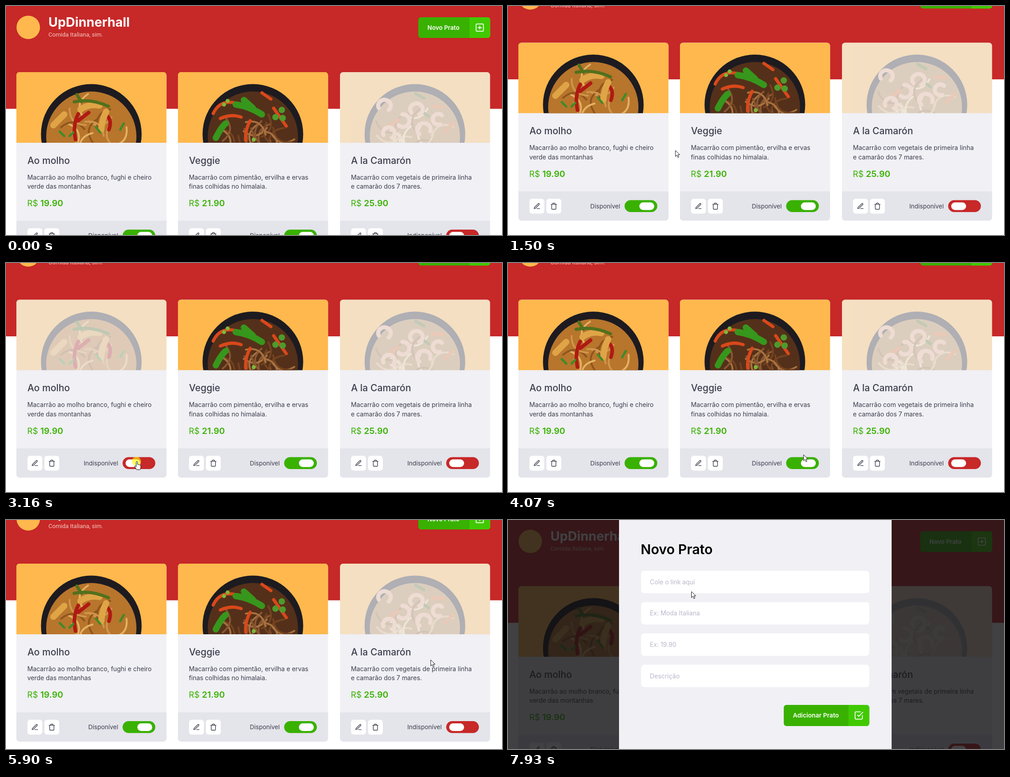
Recreate the animation shown at these times as an HTML page. Size 1099 px wide and 509 px high, loop 8000 ms.

```html
<!DOCTYPE html>
<html lang="pt">
<head>
<meta charset="utf-8">
<title>Pratos</title>
<style>
html, body { margin: 0; width: 100%; height: 100%; overflow: hidden; background: #fff; }
svg { display: block; width: 1099px; height: 509px; }
text { font-family: Inter, sans-serif; white-space: pre; }
.icon { fill: none; stroke-width: 2; stroke-linecap: round; stroke-linejoin: round; }
.strip { fill: none; stroke-linecap: round; }
</style>
</head>
<body>
<svg id="stage" viewBox="0 0 1099 509"></svg>
<script>
const LOOP = 8000, SCROLL = 65.5;
const RED = [199, 40, 40], GREEN = [57, 177, 0];
const INK = '#3d3d4d';

const ICONS = {
  edit: 'M12 20h9M16.5 3.5a2.12 2.12 0 0 1 3 3L7 19l-4 1 1-4Z',
  trash: 'M3 6h18M19 6v14a2 2 0 0 1-2 2H7a2 2 0 0 1-2-2V6m3 0V4a2 2 0 0 1 2-2h4a2 2 0 0 1 2 2v2',
  plus: 'M5 3h14a2 2 0 0 1 2 2v14a2 2 0 0 1-2 2H5a2 2 0 0 1-2-2V5a2 2 0 0 1 2-2ZM12 8v8M8 12h8',
  check: 'M9 11l3 3L22 4M21 12v7a2 2 0 0 1-2 2H5a2 2 0 0 1-2-2V5a2 2 0 0 1 2-2h11'
};

// Each piece: colour, width, path
const CARDS = [
  { x: 23, title: 'Ao molho', price: '19.90',
    lines: ['Macarrão ao molho branco, fughi e cheiro', 'verde das montanhas'],
    base: '#b8752c', noodles: ['#e2b263', '#d0954a', '#8f551d'],
    pieces: [
      ['#b01a12', 8, 'M137 93Q124 118 131 150M160 90L137 108M205 128Q212 108 202 98'],
      ['#dfa446', 14, 'M142 83Q160 70 184 74M188 128Q190 104 199 88M82 118L106 94'],
      ['#52701c', 7, 'M128 66Q165 58 204 76M134 50L144 66'],
      ['#3f8a28', 5, 'M176 122l10 12M230 128l8-14M96 132l10 10M118 142l8-8']
    ] },
  { x: 381, title: 'Veggie', price: '21.90',
    lines: ['Macarrão com pimentão, ervilha e ervas', 'finas colhidas no himalaia.'],
    base: '#54301a', noodles: ['#a87240', '#8a5730', '#73421f'],
    pieces: [
      ['#d9481a', 7, 'M78 92Q92 62 124 68M94 103Q118 92 140 100M150 152Q148 130 160 108M212 80l28 40M186 46l20 14'],
      ['#37961c', 14, 'M128 72Q158 76 186 94M146 62L166 80M84 146Q96 122 106 114'],
      ['#4f9a2c', 14, 'M216 100h.1M230 84h.1M232 102h.1'],
      ['#7eb63a', 9, 'M110 64h.1M168 150h.1M102 72h.1']
    ] },
  { x: 740, title: 'A la Camarón', price: '25.90',
    lines: ['Macarrão com vegetais de primeira linha', 'e camarão dos 7 mares.'],
    base: '#b08040', noodles: ['#ead09a', '#d8b070', '#94602c'],
    pieces: [
      ['#d9702c', 8, 'M206 76l24 2M232 132l18-18M112 118l16-12'],
      ['#62762a', 7, 'M168 48l18 10M196 98l-14-10'],
      ['#eab089', 9, 'M86 80a14 13 0 1 1 22 4M130 118a14 14 0 1 0 8-24M158 90a14 13 0 1 1 18 4M176 138a15 14 0 1 1 24-6M96 140a13 13 0 1 1 20 6M222 116a12 12 0 1 1 4-20']
    ] }
];

const text = (x, y, s, size, weight, fill, more = '') =>
  `<text x="${x}" y="${y}" font-size="${size}" font-weight="${weight}" fill="${fill}" ${more}>${s}</text>`;
const box = (x, y, w, h, r, fill, more = '') =>
  `<rect x="${x}" y="${y}" width="${w}" height="${h}" rx="${r}" fill="${fill}" ${more}/>`;
const icon = (name, cx, cy, k, stroke) =>
  `<path class="icon" stroke="${stroke}" d="${ICONS[name]}" transform="translate(${cx - 12 * k} ${cy - 12 * k}) scale(${k})"/>`;

// Green button with a lighter icon cell on the right
const button = (x, y, w, h, label, size, name) =>
  box(x, y, w, h, 6, '#39b100') +
  `<path fill="#41c900" d="M${x + w - 46} ${y}h40a6 6 0 0 1 6 6v${h - 12}a6 6 0 0 1-6 6h-40Z"/>` +
  text(x + 20.3, y + h / 2 + 4.8, label, size, 600, '#fff') +
  icon(name, x + w - 23.3, y + h / 2, .9, '#fff');

function random(seed) {
  return () => (seed = seed * 16807 % 2147483647) / 2147483647;
}

function dish({ base, noodles, pieces }, i) {
  const rnd = random(911 + i * 77);
  let s = `<circle cx="166" cy="138" r="111.5" fill="#1d1b20"/><circle cx="166" cy="143" r="100" fill="${base}"/>`;
  for (let n = 0; n < 18; n++) {
    const a = rnd() * 6.28, d = 68 * Math.sqrt(rnd()), b = rnd() * 6.28;
    const x = 166 + d * Math.cos(a), y = 140 + d * Math.sin(a);
    const dx = 26 * Math.cos(b), dy = 26 * Math.sin(b);
    s += `<path class="strip" stroke="${noodles[n % 3]}" stroke-width="4" d="M${x - dx} ${y - dy}Q${x + dy} ${y - dx} ${x + dx} ${y + dy}"/>`;
  }
  return s + pieces.map(([c, w, d]) =>
    `<path class="strip" stroke="${c}" stroke-width="${w}" d="${d}"/>`).join('');
}

function card(c, i) {
  return `<g transform="translate(${c.x} 147)">` +
    box(0, 0, 332.5, 395.5, 7, '#f0f0f5') +
    `<g id="photo${i}" clip-path="url(#top)">${box(0, 0, 333, 157, 0, '#ffb84d')}${dish(c, i)}</g>` +
    text(24.5, 203.5, c.title, 20.8, 500, INK) +
    c.lines.map((l, n) => text(24.2, 238.6 + n * 20.5, l, 13.9, 400, INK)).join('') +
    text(24, 298, 'R$', 18.5, 400, '#39b100') + text(53, 298, c.price, 19.2, 600, '#39b100') +
    '<path fill="#e4e4eb" d="M0 330.5h332.5v58a7 7 0 0 1-7 7h-318.5a7 7 0 0 1-7-7Z"/>' +
    box(24.5, 347, 33, 33, 6, '#fff') + icon('edit', 41, 363.5, .68, INK) +
    box(62, 347, 33, 33, 6, '#fff') + icon('trash', 78.5, 363.5, .68, INK) +
    text(225.5, 368.3, '', 13.5, 400, INK, `text-anchor="end" id="label${i}"`) +
    box(235.3, 350, 72.5, 26.5, 13.25, '', `id="track${i}"`) +
    box(0, 355, 33, 17, 8.5, '#fff', `id="knob${i}"`) + '</g>';
}

const fields = ['Cole o link aqui', 'Ex: Moda Italiana', 'Ex: 19.90', 'Descrição'];

document.getElementById('stage').innerHTML =
  '<clipPath id="top"><path d="M0 157V7a7 7 0 0 1 7-7h318.500a7 7 0 0 1 7 7v150Z"/></clipPath>' +
  '<g id="page">' + box(0, 0, 1099, 228.5, 0, '#c72828') +
  '<circle cx="49.300" cy="47.500" r="26" fill="#ffb84d"/>' +
  text(94, 46, 'UpDinnerhall', 28.3, 700, '#fff') +
  text(94, 68, 'Comida Italiana, sim.', 13, 400, '#f5c9c0', 'style="font-family:Roboto,sans-serif"') +
  button(913.5, 25, 159.5, 46, 'Novo Prato', 13.3, 'plus') +
  CARDS.map(card).join('') + '</g>' +
  '<g id="modal">' + box(0, 0, 1099, 509, 0, 'rgba(18,18,20,.8)') +
  box(246, -10, 604, 530, 0, '#f0f0f5') +
  text(294, 76, 'Novo Prato', 29.9, 600, '#000') +
  fields.map((f, i) => box(295, 112.8 + i * 69.6, 505.5, 50, 7, '#fff') +
    text(314.3, 142.8 + i * 69.6, f, 13.8, 400, '#b7b7cc')).join('') +
  button(611, 411, 189.5, 47, 'Adicionar Prato', 13.7, 'check') + '</g>' +
  '<circle id="press" r="10" fill="#ff0" fill-opacity=".6"/>' +
  '<g id="pointer" fill="#fff" stroke="#111" stroke-linejoin="round">' +
  '<path id="arrow" d="M0 0V13.500l3.200-3 2.200 5.200 2.300-1-2.200-5H9.700Z"/>' +
  '<path id="hand" transform="translate(-5.500 -.5)" d="M4 2a1.500 1.500 0 0 1 3 0V7l5.500 1.200q1.500.4 1.500 2V14q0 2-1.500 5H5L1 12.500q-1-2 .5-2.200 1.200 0 2.500 2Z"/></g>';

const el = id => document.getElementById(id);
const clamp = v => Math.max(0, Math.min(1, v));
const ramp = (t, start, length) => clamp((t - start) / length);
const easeOut = p => 1 - (1 - p) ** 2;

// time, x, y of the pointer tip
const PATH = [
  [130, 1072, 497], [500, 800, 108], [750, 700, 138], [960, 700, 138],
  [1450, 371, 321], [1510, 371, 321], [1710, 300, 425], [1850, 252, 430],
  [2100, 300, 436], [2330, 290, 441], [3500, 290, 441], [3930, 400, 411],
  [4200, 888, 440], [4400, 1029, 445], [5450, 1029, 445], [5900, 941, 311],
  [6100, 950, 295], [6580, 1036, 46], [6690, 1036, 46], [6740, 985, 68],
  [6810, 728, 120], [7150, 520, 240], [7310, 371, 256], [7450, 397, 188],
  [7590, 397, 188], [7750, 398, 118], [7930, 406.5, 159], [8000, 406.5, 159]
];
const PRESSES = [[2540, 2750], [3160, 3370], [4450, 4620], [5210, 5380], [6600, 6720]];
const TOGGLES = [
  { on: true, at: [2680, 3300] }, { on: true, at: [] }, { on: false, at: [4540, 5280] }
];

function pointerAt(t) {
  const i = PATH.findIndex(k => k[0] > t);
  if (i < 1) return null;
  const [a, b] = [PATH[i - 1], PATH[i]], p = ramp(t, a[0], b[0] - a[0]);
  return [a[1] + (b[1] - a[1]) * p, a[2] + (b[2] - a[2]) * p];
}

function drawToggle({ on, at }, i, t) {
  let since = 1e6;
  for (const start of at) if (t >= start) { on = !on; since = t - start; }
  const level = length => on ? clamp(since / length) : 1 - clamp(since / length);
  const k = level(200);
  el('photo' + i).setAttribute('opacity', .3 + .7 * easeOut(level(300)));
  el('label' + i).textContent = on ? 'Disponível' : 'Indisponível';
  el('track' + i).setAttribute('fill', `rgb(${RED.map((r, n) => r + (GREEN[n] - r) * k)})`);
  el('knob' + i).setAttribute('x', 242 + 26 * k);
}

function draw(t) {
  const scroll = SCROLL * (easeOut(ramp(t, 1030, 270)) - easeOut(ramp(t, 5865, 285)));
  el('page').setAttribute('transform', `translate(0 ${-scroll})`);
  TOGGLES.forEach((s, i) => drawToggle(s, i, t));
  const shown = ramp(t, 6700, 100);
  el('modal').setAttribute('opacity', shown);

  const tip = pointerAt(t), press = el('press'), pointer = el('pointer');
  pointer.style.display = tip ? '' : 'none';
  press.style.display = tip && PRESSES.some(([a, b]) => t >= a && t < b) ? '' : 'none';
  if (!tip) return;
  const [x, y] = tip;
  const inside = (l, top, r, b) => x > l && x < r && y > top && y < b;
  const top = 497 - scroll;
  const link = !shown && (CARDS.some(c => inside(c.x + 235, top, c.x + 308, top + 27)) ||
    inside(913, 25 - scroll, 1073, 71 - scroll));
  el('hand').style.display = link ? '' : 'none';
  el('arrow').style.display = link ? 'none' : '';
  pointer.setAttribute('transform', `translate(${x} ${y})`);
  press.setAttribute('transform', `translate(${x - 1} ${y - .5})`);
}

const begin = performance.now();
function tick() {
  draw((performance.now() - begin) % LOOP);
  requestAnimationFrame(tick);
}
tick();
</script>
</body>
</html>
```
